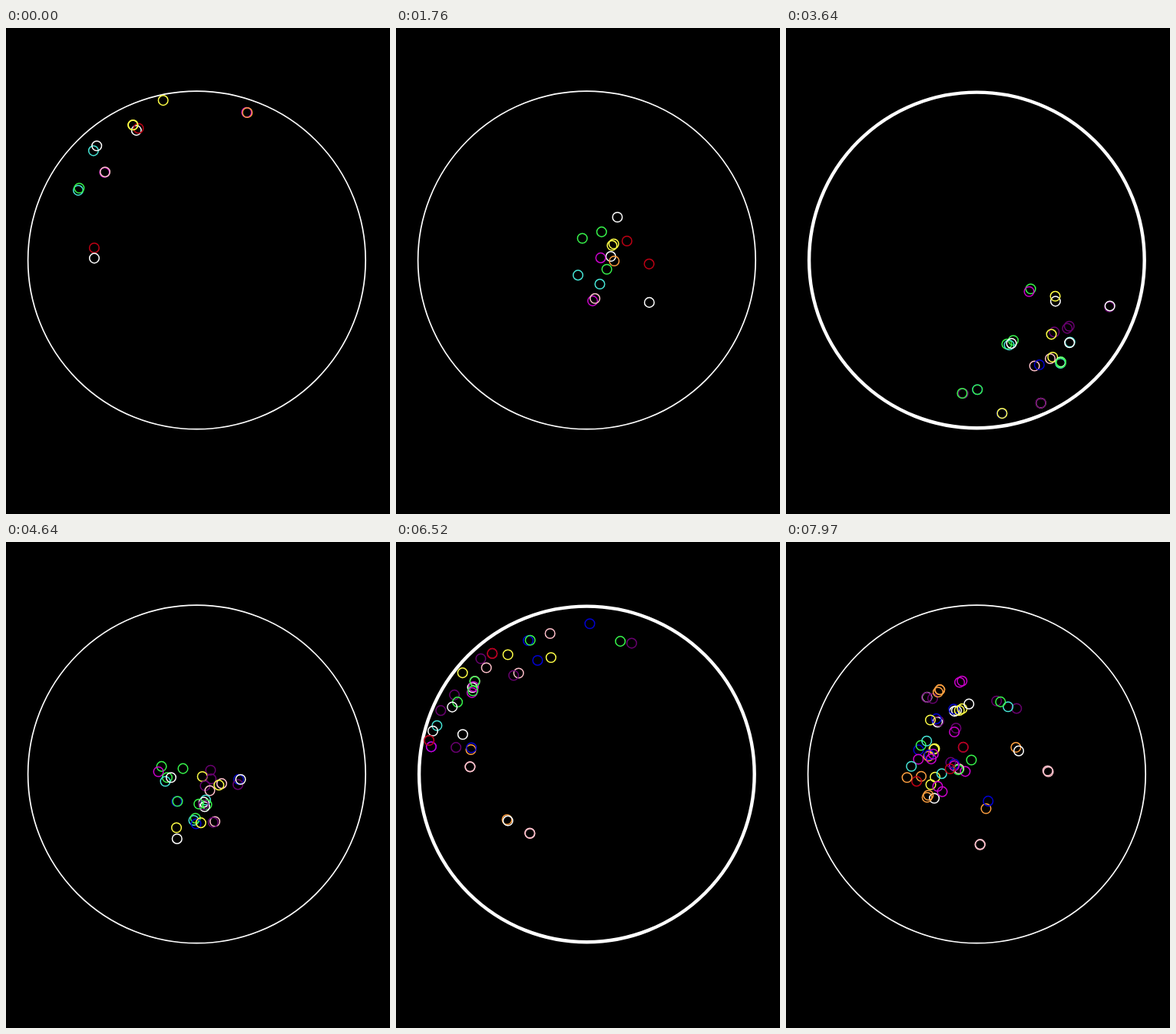
These frames come from a looping animation (500 by 632 pixels, 8000 ms). An HTML page with a canvas:

```html
<!DOCTYPE html>
<html lang="en">
<head>
<meta charset="utf-8">
<title>Splitting balls</title>
<style>
  html, body { margin: 0; width: 100%; height: 100%; overflow: hidden; background: #000; }
  canvas { display: block; }
</style>
</head>
<body>
<canvas id="stage" width="500" height="632"></canvas>
<script>
const LOOP = 8000, FLASH = 90, STEP = 4;
const CX = 248.4, CY = 301.9, REACH = 212.6;
const GRAVITY = 1.5e-5, ENERGY = 0.0063;
const COLORS = {
  red: '#be0014', orange: '#ffa040', yellow: '#ffff46', green: '#37f54b',
  cyan: '#46e6d7', blue: '#0000d2', purple: '#690070', magenta: '#cd00cd',
  pink: '#ffc0cb', white: '#ffffff'
};
const names = Object.keys(COLORS);
const ctx = document.getElementById('stage').getContext('2d');
const balls = [];

let seed = 7;
function random() {
  seed = (seed * 16807) % 2147483647;
  return seed / 2147483647;
}
const spread = size => (random() * 2 - 1) * size;

function place(b, t) {
  const dt = t - b.born;
  return { x: b.x + b.vx * dt, y: b.y + b.vy * dt + GRAVITY / 2 * dt * dt };
}

// Follows a ball until it meets the ring again.
function findHit(b) {
  for (let t = b.born; t < LOOP; t += STEP) {
    const p = place(b, t);
    const dx = p.x - CX, dy = p.y - CY;
    const outward = dx * b.vx + dy * (b.vy + GRAVITY * (t - b.born)) > 0;
    if (outward && Math.hypot(dx, dy) > REACH) {
      b.angle = Math.atan2(dy, dx);
      return t;
    }
  }
  return LOOP;
}

// Energy is kept, so the speed follows from the height.
function fly(color, born, angle, heading, radius = REACH) {
  const x = CX + radius * Math.cos(angle);
  const y = CY + radius * Math.sin(angle);
  const speed = Math.sqrt(ENERGY + 2 * GRAVITY * y);
  const b = {
    color: COLORS[color], born, x, y,
    vx: speed * Math.cos(heading), vy: speed * Math.sin(heading)
  };
  b.end = findHit(b);
  balls.push(b);
  return b;
}

// A ball leaves the ring as two, both roughly towards the centre.
function split(b) {
  const inward = b.angle + Math.PI + spread(0.24);
  for (let i = 0; i < 2; i++) {
    const color = names[Math.floor(random() * names.length)];
    fly(color, b.end, b.angle, inward + spread(0.07));
  }
}

// Opening pairs: colours, time of leaving, angle on the ring, two headings.
const pairs = [
  ['red', 'white', -645, 3.198, -0.09, 0.08],
  ['cyan', 'green', -300, 3.669, 0.487, 0.393],
  ['cyan', 'white', -160, 3.957, 0.829, 0.366],
  ['magenta', 'pink', -440, 3.916, 0.803, 0.784],
  ['white', 'red', -270, 4.246, 0.882, 0.736],
  ['yellow', 'yellow', -190, 4.245, 0.835, 0.819],
  ['green', 'green', 60, 4.503, 1.332, 1.169],
  ['magenta', 'orange', -100, 5.036, 1.85, 1.749]
];
for (const [a, b, born, angle, headA, headB] of pairs) {
  fly(a, born, angle, headA);
  fly(b, born, angle, headB);
}
for (let i = 0; i < balls.length; i++) {
  if (balls[i].end < LOOP) split(balls[i]);
}
// The ball that is just about to become the green pair.
fly('yellow', -60, 4.505, -1.78, 206.5);

function circle(x, y, r, width, color) {
  ctx.beginPath();
  ctx.arc(x, y, r, 0, Math.PI * 2);
  ctx.lineWidth = width;
  ctx.strokeStyle = color;
  ctx.stroke();
}

function draw(t) {
  ctx.fillStyle = '#000';
  ctx.fillRect(0, 0, 500, 632);
  // The ring thickens for a moment after each bounce.
  const hit = balls.some(b => b.born > 0 && t >= b.born && t < b.born + FLASH);
  if (hit) circle(CX, CY, 218.3, 4.4, '#fff');
  else circle(CX, CY, 219.8, 1.7, '#fff');
  for (const b of balls) {
    if (t < b.born || t >= b.end) continue;
    const p = place(b, t);
    circle(p.x, p.y, 6.3, 1.5, b.color);
  }
}

const begin = performance.now();
function tick() {
  draw((performance.now() - begin) % LOOP);
  requestAnimationFrame(tick);
}
tick();
</script>
</body>
</html>
```
